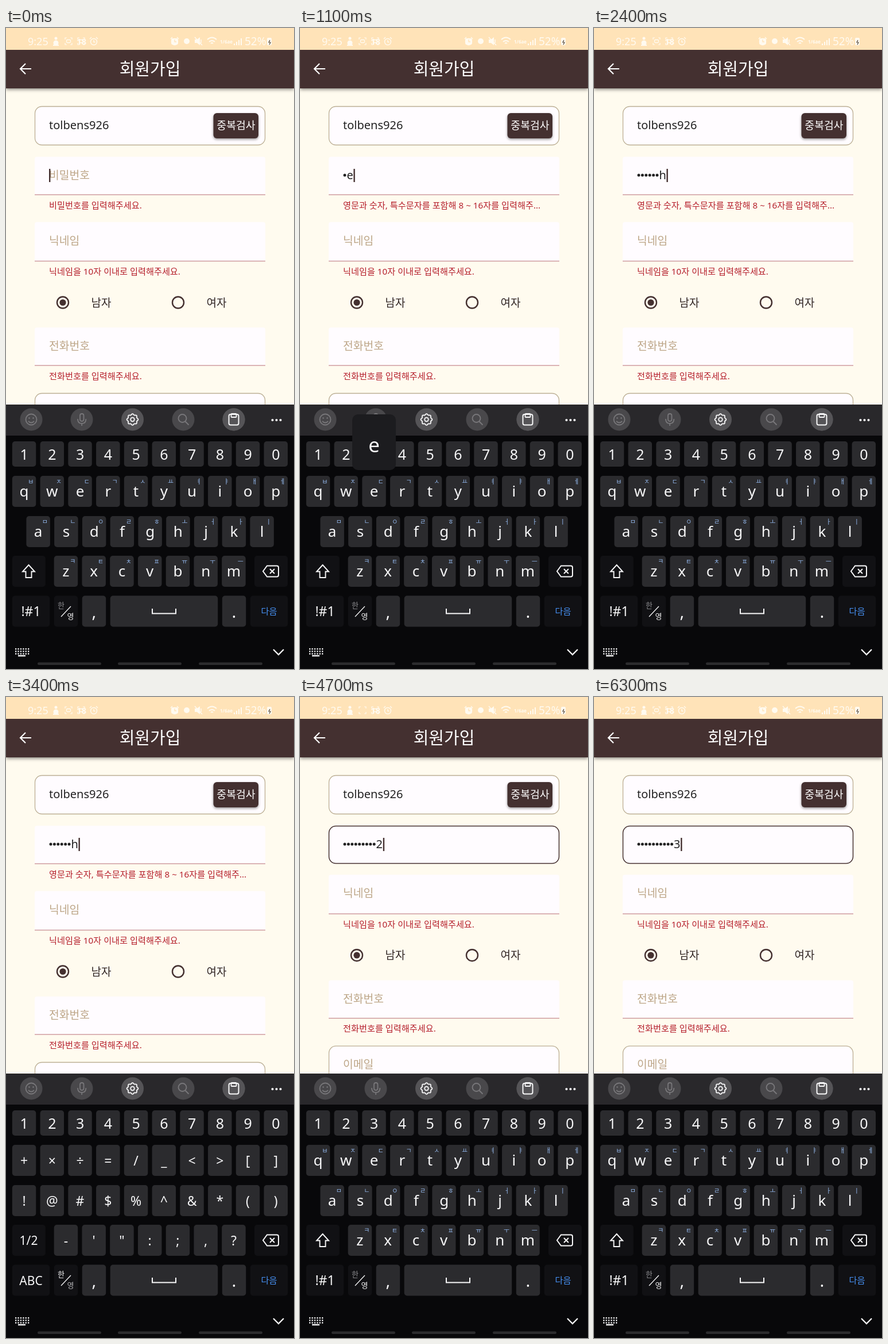
An HTML page with a canvas for the animation above (6400 ms loop, 502x1115 px).

```html
<!DOCTYPE html>
<html lang="ko">
<head>
<meta charset="utf-8">
<style>
html, body { margin: 0; width: 502px; height: 1115px; overflow: hidden; background: #fffbef; }
canvas { display: block; }
</style>
</head>
<body>
<canvas id="stage" width="502" height="1115"></canvas>
<script>
const ctx = document.getElementById('stage').getContext('2d');
const LOOP = 6400;
const FONT = '"Noto Sans", "Noto Sans CJK KR", sans-serif';
const BROWN = '#443030', CREAM = '#fffaf0', FIELD = '#fffcff', TAN = '#bcaf94', HINT = '#bda687',
  ERROR = '#b51f2c', KEY = '#2b2b2e', DARK = '#111114', WHITE = '#f7f7f8';

// Key presses: [time down, key]
const PRESSES = [[800, 't'], [1000, 'e'], [1200, 's'], [1400, 't'], [1800, 'k'], [2000, 'd'], [2200, 'h'],
  [3500, '!'], [4100, '1'], [4500, '2'], [6000, '3']];
const COMMIT = 100, POPUP = 200;
const SYMBOLS_ON = 2700, SYMBOLS_OFF = 3800, SWITCH_PRESS = 150;

const DIGITS = '1234567890';
const LETTERS = ['qwertyuiop', 'asdfghjkl', 'zxcvbnm'];
const JAMO = ['ㅂㅈㄷㄱㅅㅛㅕㅑㅐㅔ', 'ㅁㄴㅇㄹㅎㅗㅓㅏㅣ', 'ㅋㅌㅊㅍㅠㅜㅡ'];
const SYMBOLS = ['+×÷=/_<>[]', '!@#$%^&*()', '-\'":;,?'];
const ROW_TOP = [779, 849, 918], PITCH = 48.75, KEY_W = 41.5;

function box(x, y, w, h, r, fill, stroke, width = 1.3) {
  ctx.beginPath();
  ctx.roundRect(x, y, w, h, r);
  if (fill) { ctx.fillStyle = fill; ctx.fill(); }
  if (stroke) { ctx.strokeStyle = stroke; ctx.lineWidth = width; ctx.stroke(); }
}
function text(str, x, y, size, color, align = 'left', weight = 400) {
  ctx.font = `${weight} ${size}px ${FONT}`;
  ctx.textAlign = align;
  ctx.fillStyle = color;
  ctx.fillText(str, x, y);
}
// Hangul centred vertically on y
const hangul = (str, x, y, size, color, align, weight) => text(str, x, y + size * 0.37, size, color, align, weight);
function line(d, color, width = 2) {
  ctx.strokeStyle = color;
  ctx.lineWidth = width;
  ctx.stroke(new Path2D(d));
}
function shape(d, color) {
  ctx.fillStyle = color;
  ctx.fill(new Path2D(d));
}
function disc(x, y, r, fill, stroke, width) {
  box(x - r, y - r, 2 * r, 2 * r, r, fill, stroke, width);
}

function alarm(x, y) {
  disc(x, y + 1, 5.5, null, CREAM, 1.4);
  line(`M${x} ${y - 2}v3.5h2.5M${x - 7} ${y - 4}l3 -3M${x + 7} ${y - 4}l-3 -3`, CREAM, 1.4);
}
function viewfinder(x, y, filled) {
  line(`M${x - 6} ${y - 3}v-3h3M${x + 3} ${y - 6}h3v3M${x + 6} ${y + 3}v3h-3M${x - 3} ${y + 6}h-3v-3`, CREAM, 1.2);
  if (filled) box(x - 3.5, y - 2.5, 7, 5, 1.5, null, CREAM, 1.3);
}

function drawStatus(t) {
  box(0, 0, 502, 38, 0, '#ffe3b8');
  text('9:25', 38, 30, 18, CREAM);
  disc(87, 26, 4.5, CREAM);
  disc(87, 18, 2.5, CREAM);
  line('M82 30h10', CREAM, 2);
  viewfinder(109, 23, t % 1000 < 500);
  viewfinder(131, 23, true);
  text('18', 123, 29, 15, CREAM, 'left', 700);
  alarm(153, 23);
  alarm(294, 23);
  box(288, 18, 12, 11, 3, CREAM);
  line('M294 20v4h3', '#ffe3b8', 1.3);
  disc(315, 23, 5, CREAM);
  shape('M329 20h4l5 -4v14l-5 -4h-4z', CREAM);
  line('M329 16l13 14M340 20v6', CREAM, 1.5);
  line('M351 20q8 -7 16 0M354 24q5 -4 10 0M357 27q2 -2 4 0', CREAM, 1.7);
  text('1/6ae', 373, 27, 8, CREAM, 'left', 600);
  for (let i = 0; i < 4; i++) box(397 + i * 4, 27 - i * 3, 2, 3 + i * 3, 0, CREAM);
  text('52%', 416, 30, 19, CREAM);
  box(455, 17, 8, 13, 2, CREAM);
  line('M460 21l-2 4h3l-2 4', '#54483c', 1.2);
}

function drawHeader() {
  ctx.save();
  ctx.shadowColor = '#0007';
  ctx.shadowBlur = 6;
  ctx.shadowOffsetY = 2;
  box(0, 38, 502, 67, 0, BROWN);
  ctx.restore();
  line('M44 71H26M34 62l-9 9l9 9', '#fff', 2.2);
  hangul('회원가입', 251, 71, 29, '#fff', 'center', 500);
}

function errorField(y, h, hint, message) {
  box(50, y, 402, h, [4, 4, 0, 0], FIELD);
  line(`M50 ${y + h}H452`, '#cf9c9f', 1.4);
  if (hint) hangul(hint, 75, y + 32, 19.3, HINT, 'left', 500);
  hangul(message, 75, y + h + 18, 15.2, ERROR, 'left', 500);
}
function radio(x, y, label, checked) {
  disc(x, y, 10, null, BROWN, 2.4);
  if (checked) disc(x, y, 5.6, BROWN);
  hangul(label, x + 49.5, y, 19, '#302525', 'left', 500);
}

function drawPassword(t, typed, valid) {
  if (valid) box(50.5, 224.5, 401, 65, 12, FIELD, BROWN, 1.5);
  else errorField(224, 66, typed.length ? '' : '비밀번호',
    typed.length ? '영문과 숫자, 특수문자를 포함해 8 ~ 16자를 입력해주...' : '비밀번호를 입력해주세요.');

  const last = typed[typed.length - 1];
  const lastCommit = last ? last[0] + COMMIT : -300;
  const masked = typed.length - (last && t - lastCommit < 1500 ? 1 : 0);
  let x = 75 + masked * 6.4;
  for (let i = 0; i < masked; i++) disc(78 + i * 6.4, 256, 2.5, '#222');
  if (masked < typed.length) {
    text(last[1], x, 263, 20, '#222');
    x += ctx.measureText(last[1]).width;
  }
  const blinkOn = (t - lastCommit) % 1000 < 500;
  if (blinkOn) box(x + (last ? 0.7 : 0), 245, 2.4, 23, 0, BROWN);
}

function drawForm(t, typed) {
  const valid = typed.length >= 9;
  box(50.5, 136.5, 401, 67, 12, FIELD, TAN);
  text('tolbens926', 75, 176, 20, '#222');
  ctx.save();
  ctx.shadowColor = '#0006';
  ctx.shadowBlur = 4;
  ctx.shadowOffsetY = 2;
  box(361.5, 148, 78.5, 44, 6, BROWN);
  ctx.restore();
  hangul('중복검사', 401, 169.5, 18.3, '#fff', 'center', 500);

  drawPassword(t, typed, valid);

  ctx.save();
  if (valid) ctx.translate(0, -28.3);
  errorField(337.5, 68, '닉네임', '닉네임을 10자 이내로 입력해주세요.');
  radio(99, 477.5, '남자', true);
  radio(300, 477.5, '여자', false);
  errorField(521, 66, '전화번호', '전화번호를 입력해주세요.');
  box(50.5, 635.5, 401, 67, 12, FIELD, TAN);
  hangul('이메일', 75, 667, 19.3, HINT, 'left', 500);
  ctx.restore();
}

function drawToolbar() {
  box(0, 655, 502, 54, 0, '#29282b');
  [44, 132, 220.5, 309, 397].forEach((x, i) => disc(x, 681, 19.5, i % 2 || !i ? '#49484b' : '#555457'));
  disc(397, 681, 19.5, '#555457');
  const dim = '#78777a';
  disc(44, 681, 9.5, null, dim, 1.8);
  disc(40.5, 678.5, 1.3, dim);
  disc(47.5, 678.5, 1.3, dim);
  line('M39 684q5 5 10 0', dim, 1.8);
  box(129, 671, 6.5, 13, 3.2, null, dim, 1.8);
  line('M125 680q0 8 7.2 8t7.2 -8M132.2 688v4', dim, 1.8);
  disc(307.5, 679, 7, null, dim, 1.9);
  line('M312.5 684.5l6 6', dim, 1.9);

  ctx.beginPath();
  for (let a = 0; a < Math.PI * 2; a += 0.1) {
    const r = 9 + 0.9 * Math.cos(8 * a);
    ctx.lineTo(220.5 + r * Math.cos(a), 681 + r * Math.sin(a));
  }
  ctx.closePath();
  ctx.strokeStyle = WHITE;
  ctx.lineWidth = 1.8;
  ctx.stroke();
  disc(220.5, 681, 3.3, null, WHITE, 1.8);

  box(388.5, 672, 17, 18.5, 3, null, WHITE, 2);
  box(392.5, 671, 9, 6, 1, null, WHITE, 1.8);
  for (let i = -1; i < 2; i++) disc(471.5 + i * 7, 682, 2.1, WHITE);
}

const rowStart = (row, symbols) => row === 2 ? 83.7 : row === 1 && !symbols ? 35.4 : 10.8;

function keyPlace(key) {
  if (DIGITS.includes(key)) return { x: 10.8 + DIGITS.indexOf(key) * PITCH, y: 719 };
  for (const [rows, symbols] of [[LETTERS, false], [SYMBOLS, true]]) {
    const row = rows.findIndex(keys => keys.includes(key));
    if (row >= 0) return { x: rowStart(row, symbols) + rows[row].indexOf(key) * PITCH, y: ROW_TOP[row] };
  }
}

function drawKeyboard(t) {
  const symbols = t >= SYMBOLS_ON && t < SYMBOLS_OFF;
  const pressed = [SYMBOLS_ON, SYMBOLS_OFF].some(s => t >= s - SWITCH_PRESS && t < s);
  box(0, 708, 502, 407, 0, '#08080a');
  drawToolbar();

  [...DIGITS].forEach((d, i) => {
    const x = 10.8 + i * PITCH;
    box(x, 719, KEY_W, 44, 5, KEY);
    text(d, x + KEY_W / 2, 751, 25, WHITE, 'center');
  });
  (symbols ? SYMBOLS : LETTERS).forEach((keys, row) => [...keys].forEach((key, i) => {
    const x = rowStart(row, symbols) + i * PITCH, y = ROW_TOP[row];
    box(x, y, KEY_W, 54, 5, KEY);
    text(key, x + KEY_W / 2, y + 35.5, symbols ? 23 : 26, WHITE, 'center');
    if (!symbols) hangul(JAMO[row][i], x + 32.5, y + 10, 11, '#94b9ee', 'center', 500);
  }));

  box(10.8, 918, 58, 54, 5, DARK);
  if (symbols) text('1/2', 39.5, 953, 21, WHITE, 'center');
  else line('M39.5 934L50 945.5H44.5V956H34.5V945.5H29Z', WHITE, 1.9);
  box(433, 918, 58, 54, 5, DARK);
  line('M448 945l7 -9.5h17q3 0 3 3v13q0 3 -3 3h-17zM460 941l8 8M468 941l-8 8', WHITE, 2);

  box(10.8, 987.5, 65.5, 54, 5, pressed ? '#39393c' : DARK);
  text(symbols ? 'ABC' : '!#1', 43.5, 1023, symbols ? 21 : 23, WHITE, 'center', symbols ? 400 : 500);
  box(83.7, 987.5, KEY_W, 54, 5, DARK);
  hangul('한', 96, 1004.5, 13, symbols ? WHITE : '#8b8b8e', 'center');
  hangul('영', 112.5, 1023, 13, symbols ? '#b5b5b8' : WHITE, 'center');
  line('M96 1024l17 -18', WHITE, 1.3);
  box(132.7, 987.5, KEY_W, 54, 5, KEY);
  text(',', 153.3, 1026, 29, WHITE, 'center');
  box(181.7, 987.5, 187.5, 54, 5, KEY);
  line('M255 1010v8.5h41v-8.5', WHITE, 2);
  box(376.8, 987.5, KEY_W, 54, 5, KEY);
  text('.', 397.5, 1026, 29, WHITE, 'center');
  box(425.7, 987.5, 65.5, 54, 5, DARK);
  hangul('다음', 458.5, 1014.5, 15.3, '#4690f2', 'center', 500);

  for (let row = 0; row < 3; row++)
    for (let i = 0; i < 6; i++) box(16 + i * 4.4, 1079 + row * 4.2, 2.3, 2.3, 0, WHITE);
  line('M21 1092h13', WHITE, 2.4);
  line('M466 1081l9 9l9 -9', WHITE, 2.3);
  for (const x of [55, 195, 336]) box(x, 1103.5, 111, 4.5, 2.2, '#2c2c2e');

  const press = PRESSES.find(([down]) => t >= down && t < down + POPUP);
  if (press) {
    const { x, y } = keyPlace(press[1]);
    const left = Math.max(10, x + KEY_W / 2 - 38);
    box(left, y - 107, 76, 97, 10, '#1c1c1f');
    text(press[1], left + 38, y - 41, 35, WHITE, 'center');
  }
}

function draw(now) {
  const t = now % LOOP;
  const typed = PRESSES.filter(([down]) => t >= down + COMMIT);
  box(0, 0, 502, 1115, 0, '#fffbef');
  drawForm(t, typed);
  drawHeader();
  drawStatus(t);
  drawKeyboard(t);
  requestAnimationFrame(draw);
}
const start = performance.now();
requestAnimationFrame(function begin() { draw(performance.now() - start); });
draw = (render => () => render(performance.now() - start))(draw);
</script>
</body>
</html>
```
